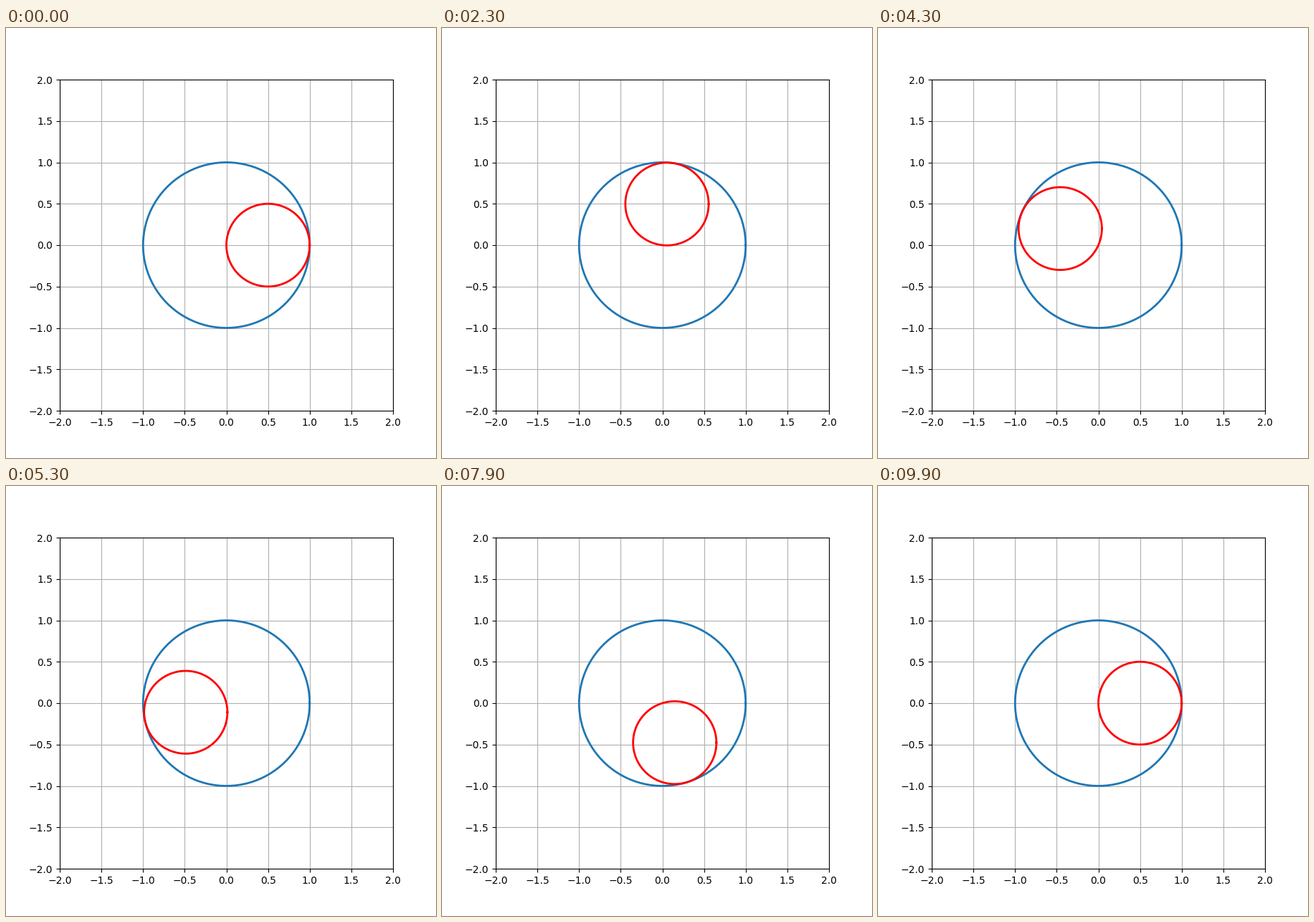
These frames come from a looping animation (600 by 600 pixels, 10000 ms). A matplotlib script:

```python
import numpy as np
import matplotlib.pyplot as plt
from matplotlib.animation import FuncAnimation

FRAMES = 100
INTERVAL = 100
R_OUTER, R_INNER = 1.0, 0.5

theta = np.linspace(0, 2 * np.pi, 100)
angles = np.linspace(0, 2 * np.pi, FRAMES)


def circle(cx, cy, r):
    return cx + r * np.cos(theta), cy + r * np.sin(theta)


fig, ax = plt.subplots(figsize=(6, 6), dpi=100)
ax.set_xlim(-2, 2)
ax.set_ylim(-2, 2)
ax.grid(True)

ax.plot(*circle(0, 0, R_OUTER), lw=2)
inner, = ax.plot([], [], "r", lw=2)


def update(i):
    """Roll the small circle once around the inside of the large one."""
    d = R_OUTER - R_INNER
    a = angles[i]
    inner.set_data(*circle(d * np.cos(a), d * np.sin(a), R_INNER))
    return inner,


anim = FuncAnimation(fig, update, frames=FRAMES, interval=INTERVAL, repeat=True)
plt.show()
```
